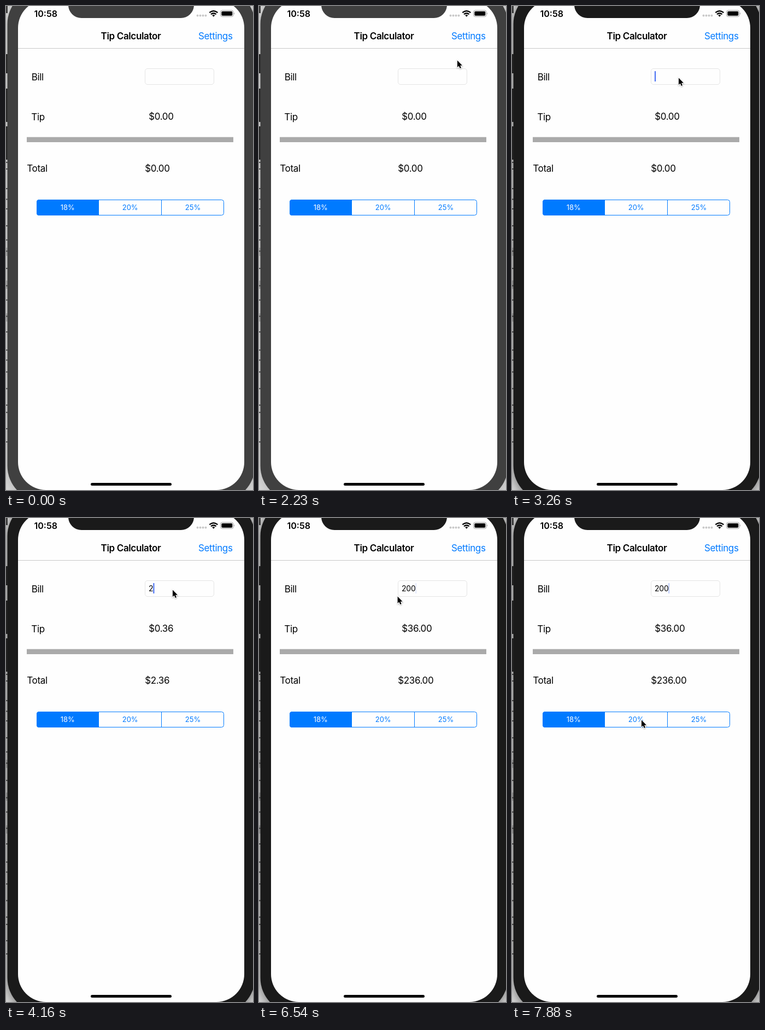
Recreate the animation shown at these times as an HTML page. Size 452 by 885 pixels, loop 8000 ms.

```html
<!DOCTYPE html>
<html lang="en">
<head>
<meta charset="utf-8">
<title>Tip Calculator</title>
<style>
  html, body { margin: 0; width: 100%; height: 100%; overflow: hidden; background: #d6d6d6; }
  svg { display: block; width: 100vw; height: 100vh; }
  text { font: 17px Inter, "Open Sans", sans-serif; letter-spacing: -.36px; white-space: pre; }
  .bold { font-weight: 600; }
  .blue { fill: #007aff; }
  .seg { font-size: 13px; letter-spacing: 0; text-anchor: middle; }
  .entry { font-size: 14px; letter-spacing: -.1px; }
</style>
</head>
<body>
<svg viewBox="0 0 452 885" preserveAspectRatio="none">
  <defs>
    <filter id="soft" x="-20%" y="-20%" width="140%" height="140%"><feGaussianBlur stdDeviation="9"/></filter>
    <filter id="drop" x="-50%" y="-50%" width="200%" height="200%">
      <feDropShadow dx="0" dy="1" stdDeviation=".8" flood-opacity=".35"/>
    </filter>
  </defs>

  <!-- desktop behind the phone -->
  <rect width="452" height="885" fill="#d6d6d6"/>
  <g id="edge"></g>
  <rect id="shadow" x="2" y="-31" width="454" height="940" rx="66" filter="url(#soft)"/>

  <!-- phone -->
  <g id="buttons">
    <rect y="88" width="5" height="35"/>
    <rect y="151" width="5" height="61"/>
    <rect y="220" width="5" height="61"/>
  </g>
  <rect id="bezel" x="2.5" y="-31" width="453" height="936" rx="64"/>
  <rect x="22" y="-11" width="414" height="896" rx="51" fill="#fefefe"/>
  <path id="notch" d="M114 -2A24 24 0 0 0 138 22H320A24 24 0 0 0 344 -2Z"/>

  <!-- status bar -->
  <text class="bold" x="51.5" y="19.5" style="font-size:16px;letter-spacing:0">10:58</text>
  <path d="M350.5 17.5H366" stroke="#c8c8c8" stroke-width="4" stroke-linecap="round" stroke-dasharray="0 5"/>
  <g fill="none" stroke="#000" stroke-width="2.3">
    <path d="M372.3 12.2Q379.8 5.8 387.3 12.2"/>
    <path d="M375 15.2Q379.8 11.2 384.6 15.2"/>
  </g>
  <path d="M377.2 17Q379.8 14.9 382.4 17L379.8 19.8Z"/>
  <rect x="392.5" y="8" width="23.5" height="11.5" rx="3.2" fill="none" stroke="#a0a0a0"/>
  <rect x="394.3" y="9.8" width="20" height="8" rx="1.8"/>
  <path d="M417.2 11.8Q419.2 13.8 417.2 15.8Z" fill="#a0a0a0"/>

  <!-- navigation bar -->
  <text class="bold" x="173.6" y="61">Tip Calculator</text>
  <text class="blue" x="351.9" y="61">Settings</text>
  <rect x="22" y="77" width="414" height="1" fill="#c8c8c8"/>

  <!-- form -->
  <text x="46.8" y="136">Bill</text>
  <rect x="254.5" y="114.5" width="126" height="29" rx="4.5" fill="#fefefe" stroke="#e4e4e4"/>
  <text id="bill" class="entry" x="260.9" y="133.6"></text>
  <rect id="caret" y="119" width="2" height="19" rx=".6" fill="#426bf2"/>
  <text x="46.3" y="209">Tip</text>
  <text id="tip" x="261.2" y="208"></text>
  <rect x="38" y="239.7" width="378" height="9.3" fill="#aaa"/>
  <text x="38.3" y="303">Total</text>
  <text id="total" x="254.2" y="303"></text>

  <!-- rate picker -->
  <rect x="56.5" y="354.5" width="342" height="28" rx="4" fill="#fefefe" stroke="#007aff"/>
  <path class="blue" d="M170 354H60.5Q56 354 56 358.5V378.5Q56 383 60.5 383H170Z"/>
  <path d="M284.5 354.5V382.5" stroke="#007aff"/>
  <text class="seg" x="112.8" y="373.4" fill="#fff">18%</text>
  <text class="seg blue" x="227.2" y="373.4">20%</text>
  <text class="seg blue" x="342" y="373.4">25%</text>

  <rect x="155" y="872" width="148" height="5" rx="2.5"/>
  <path id="cursor" d="M0 0V12.6L2.8 10.1L4.8 14.6L7 13.7L5.1 9.3H9Z" stroke="#fff" stroke-width="1.8" paint-order="stroke" filter="url(#drop)"/>
</svg>
<script>
const LOOP = 8000, STEP = 148.6, RATE = 0.18;
const ACTIVATE = 2530, FOCUS = 3260;
const ENTRY = "200", KEYS = [4010, 4310, 4750];
const $ = id => document.getElementById(id);
const money = n => "$" + n.toFixed(2);

// Pointer moves: start time, number of steps, Bezier control points
const GLIDES = [
  { start: 1050, steps: 8, path: [[207, 863], [250, 300], [485, 0], [318, 127.5]] },
  { start: 2680, steps: 2, path: [[318, 127.5], [305, 131.5]] },
  { start: 6391, steps: 4, path: [[305, 131.5], [225, 120], [190, 230], [212, 325]] },
  { start: 7130, steps: 4, path: [[212, 325], [237, 369.5]] }
];

// de Casteljau for any number of points
function bezier(path, u) {
  if (path.length === 1) return path[0];
  const mix = path.slice(1).map((p, i) => p.map((v, k) => path[i][k] + (v - path[i][k]) * u));
  return bezier(mix, u);
}

function pointer(t) {
  const glide = GLIDES.findLast(g => g.start <= t);
  if (!glide) return [-40, -40];
  const step = Math.min(glide.steps, Math.floor((t - glide.start) / STEP));
  return bezier(glide.path, step / glide.steps);
}

// The blink restarts a step after each key press
function caretOpacity(t) {
  if (t < FOCUS) return 0;
  const key = KEYS.findLast(k => k <= t);
  const since = t - (key ? key + STEP : FOCUS);
  if (since < 0) return 1;
  const phase = since % 1030;
  return phase < 590 ? 1 : phase < 730 ? .15 : phase < 880 ? 0 : .35;
}

// Sliver of the window behind, left of the phone
function drawEdge() {
  let seed = 7;
  const random = () => (seed = seed * 16807 % 2147483647) / 2147483647;
  const strip = (y, h, fill) => `<rect y="${y}" width="3" height="${h}" fill="${fill}"/>`;
  let out = strip(0, 13, "#444");
  for (let y = 442; y < 600; y += 60) out += strip(y, 15, "#b4b4b4");
  for (let y = 285; y < 800; y += 12 + 26 * random()) out += strip(y, 2, "#555");
  $("edge").innerHTML = out;
}

function render(t) {
  const active = t >= ACTIVATE;
  const shell = active ? "#1a1a1a" : "#404040";
  const typed = ENTRY.slice(0, KEYS.filter(k => k <= t).length);
  const bill = Number(typed);

  $("bezel").setAttribute("fill", shell);
  $("notch").setAttribute("fill", shell);
  $("buttons").setAttribute("fill", active ? "#222" : "#2a2a2a");
  $("shadow").setAttribute("opacity", active ? .45 : .15);

  $("bill").textContent = typed;
  $("tip").textContent = money(bill * RATE);
  $("total").textContent = money(bill * (1 + RATE));
  $("caret").setAttribute("x", 261 + 8.4 * typed.length);
  $("caret").setAttribute("opacity", caretOpacity(t));
  $("cursor").setAttribute("transform", `translate(${pointer(t)})`);
}

drawEdge();
const start = performance.now();
function tick() {
  render((performance.now() - start) % LOOP);
  requestAnimationFrame(tick);
}
tick();
</script>
</body>
</html>
```
